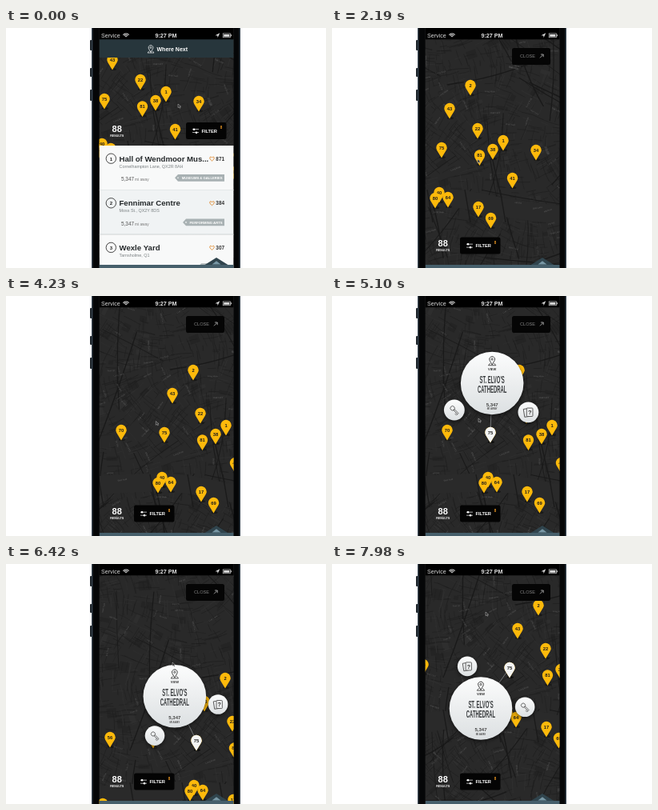
Write an HTML page with a canvas that moves like this. It is 400 px wide and 300 px high and loops after 8 s.

```html
<!DOCTYPE html>
<html lang="en">
<head>
<meta charset="utf-8">
<title>City map</title>
<style>
html, body { margin: 0; width: 100%; height: 100%; overflow: hidden; background: #fff; }
canvas { display: block; width: 400px; height: 300px; }
</style>
</head>
<body>
<canvas id="stage"></canvas>
<script>
const LOOP = 8000, TAU = Math.PI * 2;
const SANS = '"Liberation Sans", Arial, sans-serif';
const YELLOW = '#fdb90b';
const SCREEN = { x: 116.6, w: 168 };
const density = window.devicePixelRatio || 1;
const stage = document.getElementById('stage');
stage.width = 400 * density;
stage.height = 300 * density;
let c = stage.getContext('2d');

// Timing helpers
const clamp = v => Math.min(1, Math.max(0, v));
const span = (t, from, to) => clamp((t - from) / (to - from));
const smooth = p => p * p * (3 - 2 * p);
const spring = p => p <= 0 ? 0 : 1 + 3.7 * (p - 1) ** 3 + 2.7 * (p - 1) ** 2;
function track(t, keys) {
  let i = keys.findIndex(k => k[0] > t);
  if (i < 0) return keys[keys.length - 1].slice(1);
  if (i === 0) return keys[0].slice(1);
  const a = keys[i - 1], b = keys[i], p = smooth(span(t, a[0], b[0]));
  return a.slice(1).map((v, j) => v + (b[j + 1] - v) * p);
}

// Drawing helpers
function box(x, y, w, h, fill, r = 0) {
  c.fillStyle = fill;
  c.beginPath();
  c.roundRect(x, y, w, h, r);
  c.fill();
}
function disc(x, y, r, fill, stroke, width = 1) {
  c.beginPath();
  c.arc(x, y, r, 0, TAU);
  if (fill) { c.fillStyle = fill; c.fill(); }
  if (stroke) { c.strokeStyle = stroke; c.lineWidth = width; c.stroke(); }
}
function shape(points, fill, stroke, width = 1) {
  c.beginPath();
  points.forEach(([x, y], i) => i ? c.lineTo(x, y) : c.moveTo(x, y));
  if (fill) { c.closePath(); c.fillStyle = fill; c.fill(); }
  if (stroke) { c.strokeStyle = stroke; c.lineWidth = width; c.stroke(); }
}
function text(str, x, y, size, color, { bold = false, align = 'left' } = {}) {
  c.font = `${bold ? 'bold ' : ''}${size}px ${SANS}`;
  c.textAlign = align;
  c.fillStyle = color;
  c.fillText(str, x, y);
}
const boldCenter = { bold: true, align: 'center' };
function at(x, y, scale, draw) {
  c.save();
  c.translate(x, y);
  c.scale(scale, scale);
  draw();
  c.restore();
}
function dropPath(r, tip) {
  c.beginPath();
  c.arc(0, 0, r, Math.PI * .86, Math.PI * .14);
  c.quadraticCurveTo(r * .6, r * .95, 0, tip);
  c.quadraticCurveTo(-r * .6, r * .95, -r * .9, r * .43);
  c.closePath();
}
function placeIcon(x, y, scale, color) {
  at(x, y, scale, () => {
    c.strokeStyle = color;
    c.lineWidth = .9;
    dropPath(3.4, 7);
    c.stroke();
    disc(0, 0, 1.1, null, color, .8);
    shape([[-2.5, 5], [-4.7, 7.7], [4.7, 7.7], [2.5, 5]], null, color, .8);
  });
}

// Street map, painted once
const MAP = { x: -30, y: -100, w: 350, h: 450 };
function paintMap() {
  const sheet = document.createElement('canvas');
  sheet.width = MAP.w * density;
  sheet.height = MAP.h * density;
  const main = c;
  c = sheet.getContext('2d');
  c.scale(density, density);
  c.translate(-MAP.x, -MAP.y);
  let seed = 4711;
  const rnd = (a = 0, b = 1) => a + (b - a) * ((seed = seed * 16807 % 2147483647) / 2147483647);
  const spot = () => [rnd(MAP.x, MAP.x + MAP.w), rnd(MAP.y, MAP.y + MAP.h)];
  const heading = (x, y) => -.2 + .4 * Math.sin(x / 34 + y / 90) + .4 * Math.cos(y / 29 - x / 80);
  box(MAP.x, MAP.y, MAP.w, MAP.h, '#292929');

  for (let i = 0; i < 150; i++) {
    const [x, y] = spot();
    c.save();
    c.translate(x, y);
    c.rotate(heading(x, y));
    box(0, 0, rnd(5, 16), rnd(4, 12), i % 3 ? '#242424' : '#2e2e2e');
    c.restore();
  }
  function road(x, y, cross, length, color, width) {
    const a = heading(x, y) + (cross ? Math.PI / 2 : 0) + rnd(-.12, .12);
    const bend = rnd(-.1, .1) * length;
    c.beginPath();
    c.moveTo(x, y);
    c.quadraticCurveTo(
      x + length / 2 * Math.cos(a) - bend * Math.sin(a),
      y + length / 2 * Math.sin(a) + bend * Math.cos(a),
      x + length * Math.cos(a), y + length * Math.sin(a));
    c.strokeStyle = color;
    c.lineWidth = width;
    c.stroke();
  }
  for (let i = 0; i < 2300; i++)
    road(...spot(), rnd() < .5, rnd(6, 28), rnd() < .75 ? '#1e1e1e' : '#323232', rnd(.4, .8));
  for (let i = 0; i < 50; i++)
    road(...spot(), rnd() < .5, rnd(60, 170), '#191919', rnd(.8, 1.4));

  c.beginPath();
  c.moveTo(-40, 222);
  c.bezierCurveTo(60, 218, 120, 208, 170, 220);
  c.bezierCurveTo(220, 231, 260, 236, 330, 238);
  c.strokeStyle = '#2a2a2a';
  c.lineWidth = 23;
  c.stroke();
  for (const x of [40, 105, 152, 196])
    shape([[x, 204], [x + 7, 245]], null, '#1b1b1b', 1.4);

  const names = ['Mill Row', 'Fern St', 'Oak Lane', 'Long Walk', 'Well Yard', 'Hill Rd'];
  for (let i = 0; i < 150; i++) {
    const [x, y] = spot();
    c.save();
    c.translate(x, y);
    c.rotate(heading(x, y) + (rnd() < .4 ? -Math.PI / 2 : 0));
    text(names[i % names.length], 0, 0, 2.8, 'rgba(255,255,255,.24)');
    c.restore();
  }
  c = main;
  return sheet;
}
const mapSheet = paintMap();

// Pins: label, map x, map y
const pins = [
  ['2', 159, 74], ['43', 133, 103], ['22', 168, 128], ['1', 200, 143], ['34', 241, 155],
  ['38', 187, 154], ['75', 123, 152], ['81', 170.5, 161.5], ['70', 69, 149], ['56', 15, 148],
  ['41', 211.5, 190], ['40', 120, 208], ['80', 115, 215], ['64', 131, 214],
  ['17', 169, 226], ['69', 184.5, 240], ['83', 278, 222], ['85', 287, 243], ['44', 6, 231]
];
function drawPin(label, x, y, fill) {
  at(x, y - .5, 1, () => {
    c.fillStyle = 'rgba(0,0,0,.4)';
    c.beginPath();
    c.ellipse(1, 12, 4, 1.6, 0, 0, TAU);
    c.fill();
    dropPath(6.7, 12.9);
    c.fillStyle = fill;
    c.fill();
    text(label, 0, 2.2, 5.8, '#1c1c1c', boldCenter);
  });
}

// Pop-ups tethered to a pin
const popups = [
  { pin: '81', lines: ['TEMPLE OF', 'VELTHAR'], open: 2230, close: 3690, buttons: false,
    turn: [[2230, -62], [2550, -70], [3270, -136], [3540, -141]] },
  { pin: '75', lines: ["ST. ELVO'S", 'CATHEDRAL'], open: 4470, close: LOOP + 1, buttons: true,
    turn: [[5280, -88], [6420, -116], [LOOP - 20, -234.5]] }
];
function paleDisc(x, y, r) {
  const shade = c.createLinearGradient(0, y - r, 0, y + r);
  shade.addColorStop(0, '#fcfdfd');
  shade.addColorStop(.5, '#eceeef');
  shade.addColorStop(1, '#dce0e2');
  c.save();
  c.shadowColor = 'rgba(0,0,0,.55)';
  c.shadowBlur = 5 * density;
  c.shadowOffsetY = 2 * density;
  disc(x, y, r, shade);
  c.restore();
}
function keyIcon() {
  paleDisc(0, 0, 12.3);
  c.rotate(Math.PI / 4);
  disc(-3, 0, 2.6, null, '#555', .8);
  c.strokeStyle = '#555';
  c.strokeRect(-.4, -.8, 6.6, 1.6);
  shape([[4.2, .8], [4.2, 2.6], [6.2, 2.6], [6.2, .8]], null, '#555', .7);
}
function cardsIcon() {
  paleDisc(0, 0, 12.3);
  c.strokeStyle = '#444';
  c.lineWidth = .8;
  c.save();
  c.rotate(-.16);
  c.strokeRect(-5.2, -4.5, 6, 9.5);
  c.restore();
  box(-2, -5, 7.3, 10, '#eceeef', .8);
  c.stroke();
  text('?', 1.7, 2.6, 7, '#333', boldCenter);
}
function drawPopup(popup, t, panX, panY) {
  const shrink = 1 - smooth(span(t, popup.close, popup.close + 300));
  const size = spring(span(t, popup.open, popup.open + 430)) * shrink;
  if (size <= 0) return;
  const [label, mapX, mapY] = pins.find(p => p[0] === popup.pin);
  const pinX = mapX + panX, pinY = mapY + panY;
  const angle = track(t, popup.turn)[0] * Math.PI / 180;
  const reach = 62 * Math.min(1, size);
  const x = pinX + reach * Math.cos(angle), y = pinY + reach * Math.sin(angle);

  shape([[pinX, pinY], [x, y]], null, 'rgba(190,195,198,.6)', .8);
  drawPin(label, pinX, pinY, '#f3f4f4');
  if (popup.buttons) {
    const grow = spring(span(t, popup.open + 250, popup.open + 700));
    [[.92, keyIcon], [-.93, cardsIcon]].forEach(([side, icon]) => {
      const a = angle + Math.PI + side;
      if (grow > 0) at(x + 55.2 * grow * Math.cos(a), y + 55.2 * grow * Math.sin(a), grow, icon);
    });
  }
  at(x, y, size, () => {
    paleDisc(0, 0, 39.3);
    placeIcon(0, -30, 1, '#333');
    text('VIEW', 0, -16.5, 4, '#333', boldCenter);
    c.save();
    c.scale(.48, 1); // condensed face
    popup.lines.forEach((line, i) => text(line, 0, i * 11.5, 12.3, '#3a3d3f', boldCenter));
    c.restore();
    text('5,347', 0, 28.5, 6, '#444', boldCenter);
    text('MI AWAY', 0, 33.3, 3, '#555', boldCenter);
  });
}

// Interface parts
function drawHeader(y) {
  box(SCREEN.x, y, SCREEN.w, 23, '#27363c');
  placeIcon(181, y + 10.5, .85, '#fff');
  text('Where Next', 188.5, y + 14.5, 7, '#fff', { bold: true });
}
function drawClose(alpha) {
  c.globalAlpha = alpha;
  box(225, 25, 48, 21, '#050505', 2.5);
  text('CLOSE', 235, 37.3, 5.6, '#858585');
  shape([[260, 37.3], [264, 33.3]], null, '#aaa', .9);
  shape([[261, 33], [264.2, 33], [264.2, 36.2]], null, '#aaa', .9);
  c.globalAlpha = 1;
}
function drawTools(p) {
  const y = 143 * p;
  text('88', 138.7, 129.8 + y, 11, '#fff', boldCenter);
  text('RESULTS', 138.7, 135.8 + y, 3.7, '#fff', boldCenter);
  at(225 - 65 * p, 118 + 143.5 * p, 1, () => {
    box(0, 0, 50.5, 21, '#040404', 2.5);
    [[8.3, 2], [12.3, 5]].forEach(([ly, knob]) => {
      box(8, ly, 8, .8, '#ddd');
      disc(8 + knob, ly + .4, 1.3, '#fff');
    });
    text('FILTER', 19.5, 12.6, 5.7, '#fff', { bold: true });
    text('8', 44, 8.4, 4.5, '#f29a22', boldCenter);
  });
}
const places = [
  ['Hall of Wendmoor Mus...', 'Cornelhampton Lane, QX2R 8AH', '871', 'MUSEUMS & GALLERIES', 211],
  ['Fennimar Centre', 'Moss St., QX2Y 8DS', '384', 'PERFORMING ARTS', 221],
  ['Wexle Yard', 'Tarnsholme, Q1', '307', 'MARKETS', 240]
];
function heart(x, y) {
  c.beginPath();
  c.moveTo(x, y + 2.6);
  c.bezierCurveTo(x - 5, y - 1, x - 2, y - 4, x, y - 1.3);
  c.bezierCurveTo(x + 2, y - 4, x + 5, y - 1, x, y + 2.6);
  c.strokeStyle = '#e08a2e';
  c.lineWidth = 1;
  c.stroke();
}
function drawList(top) {
  places.forEach(([name, street, likes, tag, tagX], i) => at(0, top + i * 55.6, 1, () => {
    box(SCREEN.x, 0, SCREEN.w, 56, i % 2 ? '#f0f3f4' : '#f8f9f9');
    box(SCREEN.x, 55, SCREEN.w, .8, '#ced4d6');
    disc(131.3, 16.2, 6.2, null, '#333', .9);
    text(i + 1, 131.3, 18.5, 6, '#222', boldCenter);
    text(name, 141.5, 19.8, 9.6, '#24282a', { bold: true });
    text(street, 141.5, 27.8, 5.4, '#7b8183');
    text('5,347', 144, 44.3, 6.4, '#555');
    text('mi away', 161, 44.3, 4.8, '#777');
    shape([[tagX, 40.3], [tagX + 4, 36], [273, 36], [273, 44.7], [tagX + 4, 44.7]], '#a8b1b3');
    disc(tagX + 4, 40.3, .8, '#fff');
    text(tag, 270.5, 42, 4.2, '#fff', { bold: true, align: 'right' });
    heart(257.5, 16.5);
    text(likes, 273, 18.8, 6.4, '#333', { bold: true, align: 'right' });
  }));
}
function drawBottomBar() {
  shape([[247, 297], [263, 287], [279, 297]], '#30444d');
  shape([[257.5, 295.5], [263, 291.3], [268.5, 295.5]], '#7897a5');
  box(SCREEN.x, 296, SCREEN.w, 4, '#465f6b');
}
function drawPhone() {
  [[15, 13], [50, 11], [77, 14]].forEach(([y, h]) => box(105, y, 2.5, h, '#1d2329', 1));
  box(107, 0, 186, 300, '#36434e');
  box(108.4, 0, 183.2, 300, '#050607');
}
function drawStatus() {
  box(SCREEN.x, 0, SCREEN.w, 14.3, '#000');
  text('Service', 119, 11.8, 7.1, '#ddd');
  text('9:27 PM', 200, 11.8, 7.2, '#e4e4e4', boldCenter);
  [1.2, 3, 4.8].forEach(r => {
    c.beginPath();
    c.arc(150, 11.8, r, -Math.PI * .77, -Math.PI * .23);
    c.strokeStyle = '#ddd';
    c.lineWidth = 1.1;
    c.stroke();
  });
  shape([[261.5, 9.3], [267.3, 6.3], [264.6, 12], [264.3, 9.5]], '#ddd');
  c.lineWidth = .7;
  c.strokeStyle = '#ccc';
  c.strokeRect(271.2, 6.9, 9.2, 4.8);
  box(272.2, 7.9, 7.2, 2.8, '#ddd');
  box(281, 8.2, .9, 2, '#ddd');
}
const cursorPath = [
  [0, 215, 95], [200, 215, 95], [1020, 198, 172], [1110, 198, 172], [1800, 212, 170],
  [2150, 182, 164], [2450, 182, 164], [3200, 226, 189], [3540, 226, 189],
  [4400, 183, 153], [5280, 183, 153], [6420, 208, 123], [7980, 192, 60]
];
function drawCursor(t) {
  at(...track(t, cursorPath), 1, () =>
    shape([[0, 0], [0, 4.6], [1.2, 3.6], [2.2, 5.2], [3, 4.8], [2.2, 3.2], [3.6, 3.1]],
      '#222', '#c8c8c8', .5));
}

const panPath = [
  [270, 0, -63], [1000, 0, 0], [1110, 0, 0], [1800, 14, -2], [2450, 14, -2],
  [3150, 75, 19], [5280, 75, 19], [6420, 115, 69], [7980, 99, -22]
];
function render(now) {
  const t = now % LOOP;
  const expand = smooth(span(t, 270, 1000));
  const [panX, panY] = track(t, panPath);
  c.setTransform(density, 0, 0, density, 0, 0);
  box(0, 0, 400, 300, '#fff');
  drawPhone();
  c.save();
  c.beginPath();
  c.rect(SCREEN.x, 0, SCREEN.w, 300);
  c.clip();
  c.drawImage(mapSheet, MAP.x + panX, MAP.y + panY, MAP.w, MAP.h);
  pins.forEach(([label, x, y]) => drawPin(label, x + panX, y + panY, YELLOW));
  popups.forEach(popup => drawPopup(popup, t, panX, panY));
  drawTools(expand);
  drawClose(expand);
  if (expand < 1) {
    drawHeader(14 - 23 * expand);
    drawList(147 + 153 * expand);
  }
  drawBottomBar();
  drawCursor(t);
  drawStatus();
  c.restore();
  requestAnimationFrame(render);
}
requestAnimationFrame(render);
</script>
</body>
</html>
```
